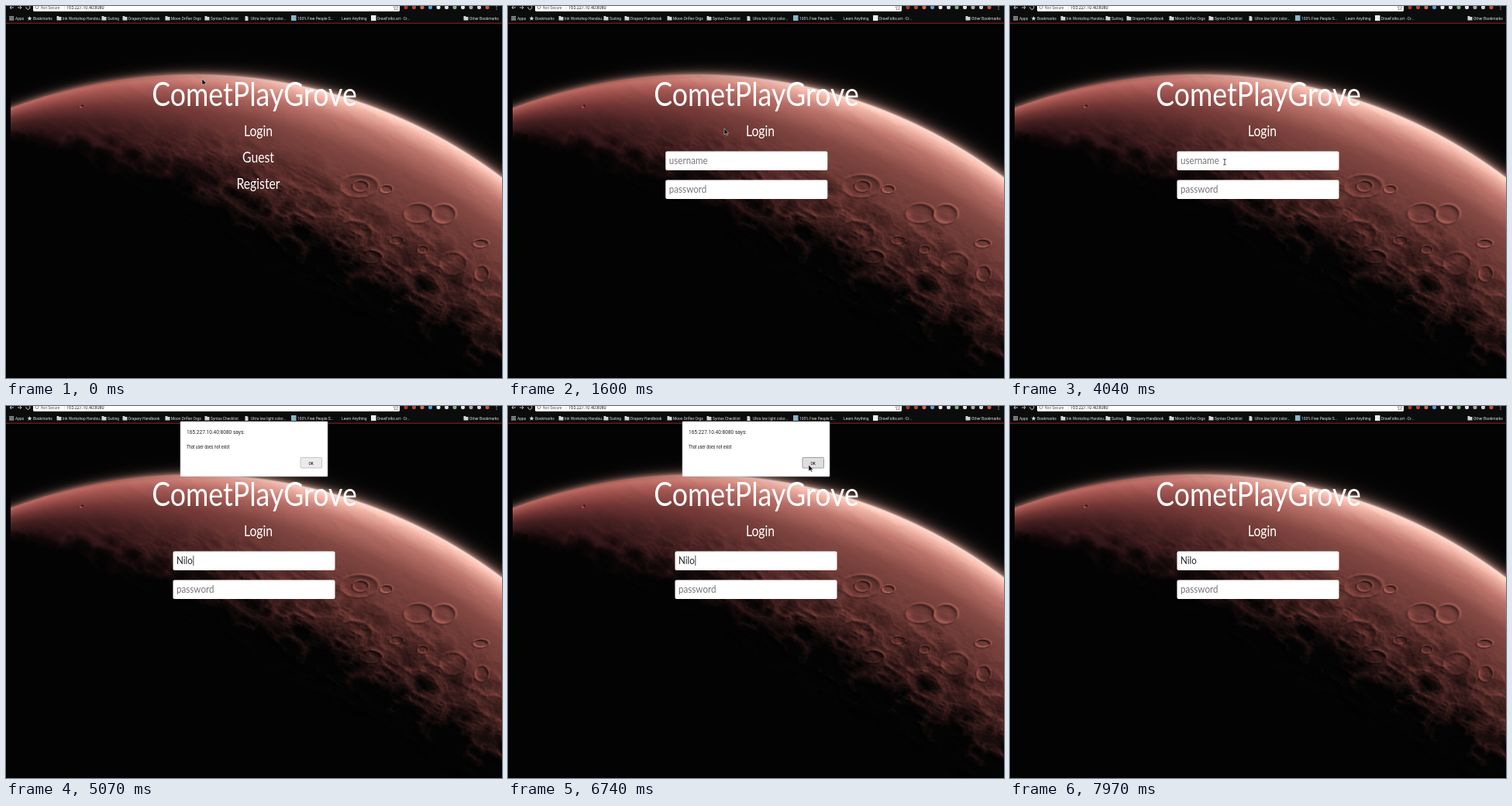
These frames come from a looping animation (640x480 px, 8 s). An HTML page with a canvas:

```html
<!DOCTYPE html>
<html lang="en">
<head>
<meta charset="utf-8">
<title>Login</title>
<style>
html, body { margin: 0; width: 100%; height: 100%; overflow: hidden; background: #030303; }
canvas, svg { position: absolute; left: 0; top: 0; width: 640px; height: 480px; }
.page { font-family: Lato, sans-serif; fill: #fff; }
.chrome { font-family: Roboto, sans-serif; font-size: 5.7px; }
.hint { fill: #77757a; }
.dark { fill: #252527; }
</style>
</head>
<body>
<canvas id="sky" width="640" height="480"></canvas>
<svg viewBox="0 0 640 480">
  <g id="bar" class="chrome">
    <rect width="640" height="22" fill="#0c0c0d"/>
    <rect y="21.7" width="640" height="1.2" fill="#72201f"/>
    <path d="M35 0H508V5.500Q508 7 506 7H37Q35 7 35 5.500Z" fill="#fff"/>
    <path d="M10 2H5M7 0L5 2 7 4M15 2H20M18 0L20 2 18 4M30 0A2.500 2.500 0 1 1 26 1" fill="none" stroke="#d5d5d8" stroke-width=".9"/>
    <circle cx="40" cy="1.5" r="2" fill="none" stroke="#555" stroke-width=".7"/>
    <path d="M500 1H506L504.500 3 505 5 503 4 501 5 501.500 3Z" fill="none" stroke="#666" stroke-width=".6"/>
  </g>

  <g id="page" class="page"></g>
  <g id="form" class="page">
    <g>
      <rect x="215.5" y="187.5" width="209" height="24.5" rx="2"/>
      <rect x="215.5" y="224.5" width="209" height="24.5" rx="2"/>
    </g>
    <g id="fields"></g>
    <rect id="caret" y="193" width=".9" height="13" fill="#333"/>
  </g>

  <g id="alert" class="chrome">
    <rect x="225" y="20" width="190" height="71" rx="1" fill="#fff" stroke="#b5b5b5" stroke-width=".6"/>
    <rect id="ok" x="380" y="66.5" width="27.5" height="13.5" rx="1" stroke-width=".8"/>
  </g>

  <g id="cursor">
    <path id="arrow" d="M0 0V8L2 6.400 3.200 9 4.400 8.500 3.200 6H5.700Z" fill="#080808" stroke="#eee" stroke-width=".5"/>
    <path id="beam" d="M-1.800-3.500Q0-3.500 0-2.500 0-3.500 1.800-3.500M0-3V3.500M-1.800 4Q0 4 0 3 0 4 1.800 4" fill="none" stroke="#222" stroke-width=".8"/>
  </g>
</svg>
<script>
const $ = id => document.getElementById(id);
const SQUEEZE = 0.83; // the screen is shown narrower than it was laid out

function add(parent, tag, attrs, text = '') {
  const el = document.createElementNS('http://www.w3.org/2000/svg', tag);
  for (const key in attrs) el.setAttribute(key, attrs[key]);
  el.textContent = text;
  return parent.appendChild(el);
}
const label = (parent, text, x, y, size, more = {}) =>
  add(parent, 'text', { transform: `translate(${x} ${y}) scale(${SQUEEZE} 1)`, 'font-size': size, ...more }, text);

// ---- browser bar ----
const bar = $('bar');
label(bar, 'Not Secure', 45, 4, 6, { fill: '#555' });
label(bar, '|', 74.5, 4, 6, { fill: '#aaa' });
label(bar, '165.227.10.40:8080', 78, 4, 6.6, { fill: '#28282b' });

const bookmarks = [
  [12, 'Apps', 'apps'], [35, 'Bookmarks', 'star'], [73, 'Ink Workshop Handou...', 'folder'],
  [131, 'Suiting', 'folder'], [158, 'Drapery Handbook', 'folder'], [213, 'Moon Drifter Orgs', 'folder'],
  [264, 'Syntax Checklist', 'folder'], [316, 'Ultra low light color...', 'page'],
  [376, '100% Free People S...', '#8ab4c4'], [433, 'Learn Anything', ''],
  [479, 'DrawFolks.art - Cr...', '#eee'], [598, 'Other Bookmarks', 'folder']
];
const icons = {
  folder: 'M0 0H2.500L3.300 1H6V5.500H0Z',
  page: 'M0 0H2.700L4 1.400V6H0Z',
  star: 'M3 0L3.800 2.100 6 2.200 4.300 3.600 4.900 5.800 3 4.600 1.100 5.800 1.700 3.600 0 2.200 2.200 2.100Z',
  apps: [0, 2, 4].map(y => [0, 2, 4].map(x => `M${x} ${y}h1.400v1.400h-1.400z`).join('')).join('')
};
for (const [x, text, icon] of bookmarks) {
  label(bar, text, x, 18, 5.9, { fill: '#e2e2e6' });
  if (icons[icon]) add(bar, 'path', { d: icons[icon], transform: `translate(${x - 7.5} 13)`, fill: '#d2d2d8' });
  else if (icon) add(bar, 'rect', { x: x - 8, y: 12, width: 6.5, height: 7, fill: icon });
}
['#a83532', '#b8433a', '#cf6a55', '#609dce', '#eee', '#dedede', '#88ad80', '#e7e7e7', '#aaa', '#dcd6d0', '#c6533d']
  .forEach((fill, i) => add(bar, 'circle', { cx: 516 + i * 10.5, cy: 1.7, r: 2.5, fill }));
for (const cy of [0.5, 2.5, 4.5]) add(bar, 'circle', { cx: 633, cy, r: 0.6, fill: '#ccc' });

// ---- page, form and alert text ----
const middle = { 'text-anchor': 'middle' };
label($('page'), 'CometPlayGrove', 320.5, 129, 43, middle);
const menu = ['Login', 'Guest', 'Register'].map((text, i) =>
  label($('page'), text, 325.5, 168 + i * 34, 19, middle));

const userHint = label($('fields'), 'username', 220, 203.5, 14, { class: 'hint' });
label($('fields'), 'password', 220, 240.5, 14, { class: 'hint' });
const userText = label($('fields'), '', 220, 203.5, 14, { class: 'dark' });
label($('alert'), '165.227.10.40:8080 says:', 233, 35.5, 7.9, { class: 'dark' });
label($('alert'), 'That user does not exist', 233, 54.5, 6.3, { class: 'dark' });
label($('alert'), 'OK', 393.7, 75.5, 5.8, { class: 'dark', ...middle, 'font-weight': 500 });

// ---- planet ----
const clamp = (v, lo = 0, hi = 1) => Math.min(hi, Math.max(lo, v));
const mix = (a, b, t) => a + (b - a) * t;
const smooth = (a, b, v) => { const t = clamp((v - a) / (b - a)); return t * t * (3 - 2 * t); };

function hash(x, y) {
  let n = Math.imul(x, 374761393) + Math.imul(y, 668265263);
  n = Math.imul(n ^ (n >>> 13), 1274126177);
  return ((n ^ (n >>> 16)) >>> 0) / 4294967296;
}
function noise(x, y) {
  const i = Math.floor(x), j = Math.floor(y), u = smooth(0, 1, x - i), v = smooth(0, 1, y - j);
  return mix(mix(hash(i, j), hash(i + 1, j), u), mix(hash(i, j + 1), hash(i + 1, j + 1), u), v);
}
// ridged noise, stretched along the falling line of the shadow edge
function ridges(x, y) {
  let sum = 0, amp = 0.5;
  const along = x * .87 + y * .5, across = (y * .87 - x * .5) * 1.6;
  for (let f = 1 / 34; f < 0.4; f *= 2, amp *= 0.55)
    sum += amp * (1 - Math.abs(2 * noise(along * f, across * f) - 1));
  return sum;
}

// position, red, green, blue
const leftTones = [[0, 150, 82, 76], [.06, 186, 103, 96], [.15, 160, 82, 78], [.32, 112, 52, 51], [.5, 70, 32, 33], [.7, 46, 20, 22], [.88, 16, 7, 8], [1.05, 3, 3, 3]];
const rightTones = [[0, 255, 232, 222], [.05, 246, 186, 172], [.15, 190, 118, 109], [.32, 134, 74, 68], [.6, 88, 45, 42], [.85, 44, 22, 21], [1.05, 3, 3, 3]];
function tone(stops, u, c) {
  let i = 1;
  while (i < stops.length - 1 && u > stops[i][0]) i++;
  const a = stops[i - 1], b = stops[i];
  return mix(a[c], b[c], clamp((u - a[0]) / (b[0] - a[0])));
}

// x, y, rx, ry
const craters = [
  [455, 232, 24, 14], [457, 232, 10, 7], [448, 294, 23, 17], [531, 267, 18, 12], [564, 268, 15, 12],
  [576, 332, 17, 14], [503, 302, 9, 5], [613, 345, 9, 10], [470, 323, 14, 8],
  [612, 306, 10, 5], [97, 129, 3, 1.5], [490, 236, 8, 5], [537, 314, 7, 5]
];
function craterHeight(x, y) {
  let h = 0;
  for (const [cx, cy, rx, ry] of craters) {
    const r = Math.hypot((x - cx) / rx, (y - cy) / ry);
    if (r < 1.25) h += r < 1 ? r ** 5 - 0.6 : 0.4 * (1 - smooth(1, 1.25, r));
  }
  return h;
}

function drawPlanet() {
  const W = 640, H = 480, cx = 241, cy = 751, R = 665, edge = 6, top = 23;
  const space = [3, 3, 3];
  const ctx = $('sky').getContext('2d');
  const img = ctx.createImageData(W, H);
  const limb = x => cy - Math.sqrt(R * R - (x - cx) ** 2);
  const span = x => 42 + 188 * Math.sin(x / 650 * Math.PI / 2);
  const height = new Float32Array(W * H), ground = new Float32Array(W * H).fill(.5);
  for (let x = 0; x < W; x++) for (let y = 60; y < H; y++) {
    const u = (y - limb(x)) / span(x), k = y * W + x;
    if (u < 0 || u > 1.4) continue;
    ground[k] = ridges(x, y);
    const rough = 0.06 + 1.5 * smooth(.35, .95, u) * smooth(30, 330, x);
    height[k] = ground[k] * rough + craterHeight(x, y) * 0.45;
  }
  for (let y = 0; y < H; y++) for (let x = 0; x < W; x++) {
    const k = y * W + x, right = smooth(90, 450, x);
    let rgb = space;
    if (x >= edge && y >= top) {
      const depth = R - Math.hypot(x - cx, y - cy);
      const glow = Math.exp(Math.min(depth, 0) / mix(4, 6, right)) * mix(.6, 1, right);
      rgb = [3 + 135 * glow, 3 + 100 * glow, 3 + 92 * glow];
      if (depth > 0) {
        const u0 = (y - limb(x)) / span(x);
        const u = u0 + (.5 - ground[k]) * .45 * smooth(.35, .95, u0);
        const slope = u0 > .02 && u0 < 1.35 && x > 1 && x < W - 1
          ? height[k + W - 1] - height[k - W + 1] : 0;
        const light = clamp(1 + slope * 1.7, .3, 1.9);
        const haze = smooth(0, 3, depth);
        rgb = rgb.map((v, c) => mix(v, mix(tone(leftTones, u, c + 1), tone(rightTones, u, c + 1), right) * light, haze));
      }
    }
    img.data.set([...rgb, 255], k * 4);
  }
  ctx.putImageData(img, 0, 0);
}
drawPlanet();

// ---- motion ----
const LOOP = 8000, CLICK = 1050, SLIDE = 800, FOCUS = 2150, TYPE = 4300, ALERT = 5010, CLOSE = 7000;
const USER = 'Nilo';
const path = [[0, 253, 94], [250, 254, 96], [850, 319, 162], [1200, 318, 162], [1600, 279, 158],
  [2050, 277, 201], [5600, 277, 201], [6450, 388, 76]];

function cursorAt(t) {
  const i = path.findIndex(p => p[0] > t);
  if (i < 0) return path[path.length - 1].slice(1);
  const a = path[i - 1], b = path[i], p = smooth(a[0], b[0], t);
  return [mix(a[1], b[1], p), mix(a[2], b[2], p)];
}
const show = (el, on) => { el.style.display = on ? '' : 'none'; };

function draw(now) {
  const t = now % LOOP;
  show(menu[1], t < CLICK);
  show(menu[2], t < CLICK);

  show($('form'), t >= CLICK);
  const left = 1 - clamp((t - CLICK) / SLIDE);
  $('form').setAttribute('transform', `translate(${-400 * left ** 3} 0)`);

  const typed = USER.slice(0, clamp(Math.floor((t - TYPE) / 130) + 1, 0, USER.length));
  userText.textContent = typed;
  show(userHint, !typed);
  const since = t >= CLOSE ? t - CLOSE : t >= TYPE ? 0 : t - FOCUS;
  show($('caret'), since >= 0 && since % 1000 < 500);
  $('caret').setAttribute('x', 220 + (typed ? userText.getComputedTextLength() * SQUEEZE + .5 : 0));

  show($('alert'), t >= ALERT && t < CLOSE);
  const hover = t > 6400;
  $('ok').setAttribute('fill', hover ? '#dfdfdf' : '#ebebeb');
  $('ok').setAttribute('stroke', hover ? '#888' : '#bbb');

  const [x, y] = cursorAt(t);
  show($('cursor'), t < TYPE || (t > 5600 && t < 7400));
  $('cursor').setAttribute('transform', `translate(${x.toFixed(2)} ${y.toFixed(2)})`);
  const overField = t >= CLICK && y > 187 && x > 215;
  show($('arrow'), !overField);
  show($('beam'), overField);
}

let start;
function frame(now) {
  start ??= now;
  draw(now - start);
  requestAnimationFrame(frame);
}
draw(0);
requestAnimationFrame(frame);
</script>
</body>
</html>
```
